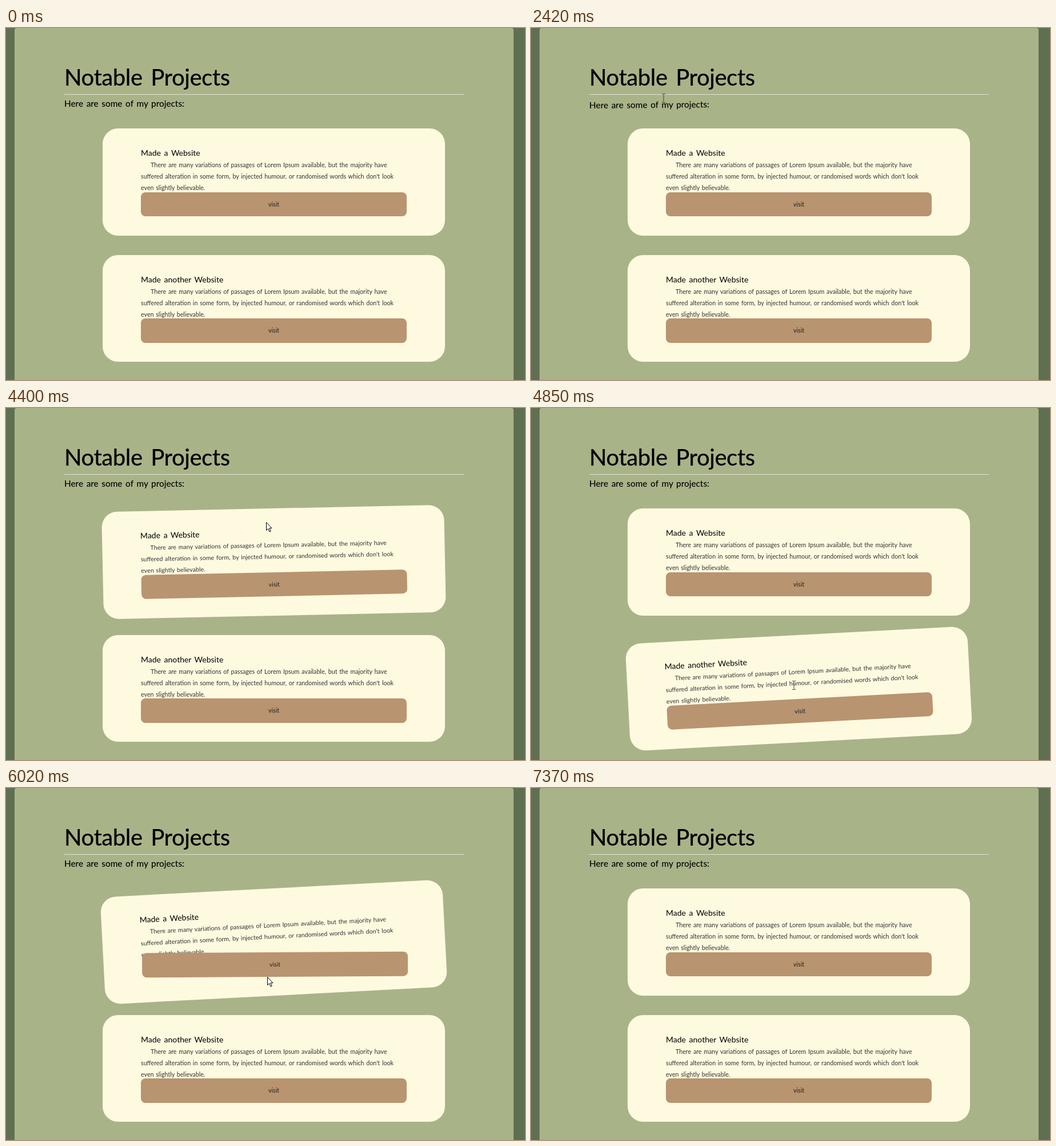
These frames come from a looping animation (908x617 px, 8.24 s). An HTML page:

```html
<!DOCTYPE html>
<html lang="en">
<head>
<meta charset="utf-8">
<title>Notable Projects</title>
<style>
  html, body { margin: 0; width: 100%; height: 100%; overflow: hidden; background: #5f6f52; }
  body { position: relative; font-family: Lato, "Open Sans", sans-serif; color: #000; }
  body * { position: absolute; margin: 0; white-space: nowrap; }
  #page { left: 15px; top: 0; width: 873px; height: 630px; border-radius: 4px; background: #a9b388; }
  h1, #rule, #intro { left: 102px; width: 699px; }
  h1 { top: 58px; font-weight: 500; font-size: 40px; line-height: 56px; letter-spacing: -.5px; word-spacing: 5px; }
  #rule { top: 116px; height: 1px; background: #e0e2d2; }
  #intro { top: 121px; font-weight: 500; font-size: 15.3px; line-height: 22px; word-spacing: 1.8px; }
  .card { left: 169px; width: 599px; height: 187.5px; border-radius: 27px; background: #fefae0; }
  .card * { left: 67px; }
  h2 { top: 33px; font-weight: 400; font-size: 14px; line-height: 20px; word-spacing: 2px; }
  .card p { top: 54px; font-size: 10.7px; line-height: 20px; text-indent: 17px; word-spacing: 1px; color: #333; }
  .card br { position: static; }
  .visit { top: 111.6px; width: 465px; height: 42.6px; border-radius: 8px; background: #b99470;
    font-size: 10.7px; line-height: 42px; text-align: center; color: #222; }
  #pointer { left: 0; top: 0; width: 20px; height: 20px; overflow: visible; }
</style>
</head>
<body>
<div id="page"></div>
<h1 id="title" class="tilt">Notable Projects</h1>
<div id="rule"></div>
<p id="intro" class="tilt">Here are some of my projects:</p>
<svg id="pointer">
  <path id="arrow" d="M.5 .5V14.5L3.7 11.5L6 17L8.2 16L5.9 10.7H10Z" fill="#fff" stroke="#000"/>
  <path id="beam" d="M-3 -7.5H-.7L0 -7L.7 -7.5H3M0 -7V7M-3 7.5H-.7L0 7L.7 7.5H3" fill="none" stroke="#444"/>
</svg>
<script>
const LOOP = 8240, TICK = 65.4, FADE = 200, TILT = 3;
const $ = id => document.getElementById(id);
const pointer = $('pointer');

function addCard(top, heading) {
  pointer.insertAdjacentHTML('beforebegin', `
    <div class="card tilt" style="top:${top}px">
      <h2>${heading}</h2>
      <p>There are many variations of passages of Lorem Ipsum available, but the majority have<br>suffered alteration in some form, by injected humour, or randomised words which don't look<br>even slightly believable.</p>
      <div class="visit tilt">visit</div>
    </div>`);
}
addCard(176, 'Made a Website');
addCard(397.5, 'Made another Website');

// Turning points of the pointer: [time, x, y]
const sweep = [[394, 745, 596], [550, 20, 594]];
const tour = [
  [1310, 10, 178], [1800, 190, 88], [2350, 226, 117], [3060, 460, 372], [3230, 490, 535],
  [3600, 485, 520], [4245, 454, 150], [4800, 460, 490], [5290, 450, 250], [5410, 449, 312],
  [6330, 460, 337], [6670, 462, 453], [7230, 755, 610], [7320, 762, 620]
];

function pointerAt(t) {
  const path = t < 1000 ? sweep : tour;
  const i = path.findIndex(key => key[0] > t);
  if (i < 1) return null;
  const [t0, x0, y0] = path[i - 1], [t1, x1, y1] = path[i];
  const p = (1 - Math.cos(Math.PI * (t - t0) / (t1 - t0))) / 2;
  return [x0 + (x1 - x0) * p, y0 + (y1 - y0) * p];
}

const inside = (box, spot) => !!spot && spot[0] > box.left && spot[0] < box.right
  && spot[1] > box.top && spot[1] < box.bottom;

// Each tilting element knows when the pointer enters and leaves its resting box
const tilters = [...document.querySelectorAll('.tilt')].map(el => {
  const box = el.getBoundingClientRect(), turns = [];
  let over = false;
  for (let t = 0; t < LOOP; t++) {
    if (inside(box, pointerAt(t)) !== over) {
      over = !over;
      turns.push({ t, sign: over ? 1 : -1 });
    }
  }
  // Buttons turn back against their tilted card
  return { el, turns, angle: el.className.includes('visit') ? TILT : -TILT };
});
const texts = [...document.querySelectorAll('h1, #intro, h2, .card p')].map(el => {
  const range = document.createRange();
  range.selectNodeContents(el);
  return range.getBoundingClientRect();
});

const ease = p => 1 - (1 - Math.min(1, Math.max(0, p))) ** 2.3;

function draw(now) {
  const time = now % LOOP;
  // Poses are held between ticks
  const t = 1310 + TICK * Math.floor((time - 1300) / TICK);
  for (const { el, turns, angle } of tilters) {
    const amount = turns.reduce((sum, turn) => sum + turn.sign * ease((t - turn.t) / FADE), 0);
    el.style.transform = amount < .004 ? 'none' : `rotate(${angle * amount}deg)`;
  }
  const spot = time < 430 ? null : pointerAt(t);
  pointer.style.display = spot ? 'block' : 'none';
  if (spot) {
    const overText = texts.some(box => inside(box, spot));
    pointer.style.transform = `translate(${Math.round(spot[0])}px, ${Math.round(spot[1])}px)`;
    $('arrow').style.display = overText ? 'none' : 'inline';
    $('beam').style.display = overText ? 'inline' : 'none';
  }
  requestAnimationFrame(draw);
}
requestAnimationFrame(draw);
</script>
</body>
</html>
```
